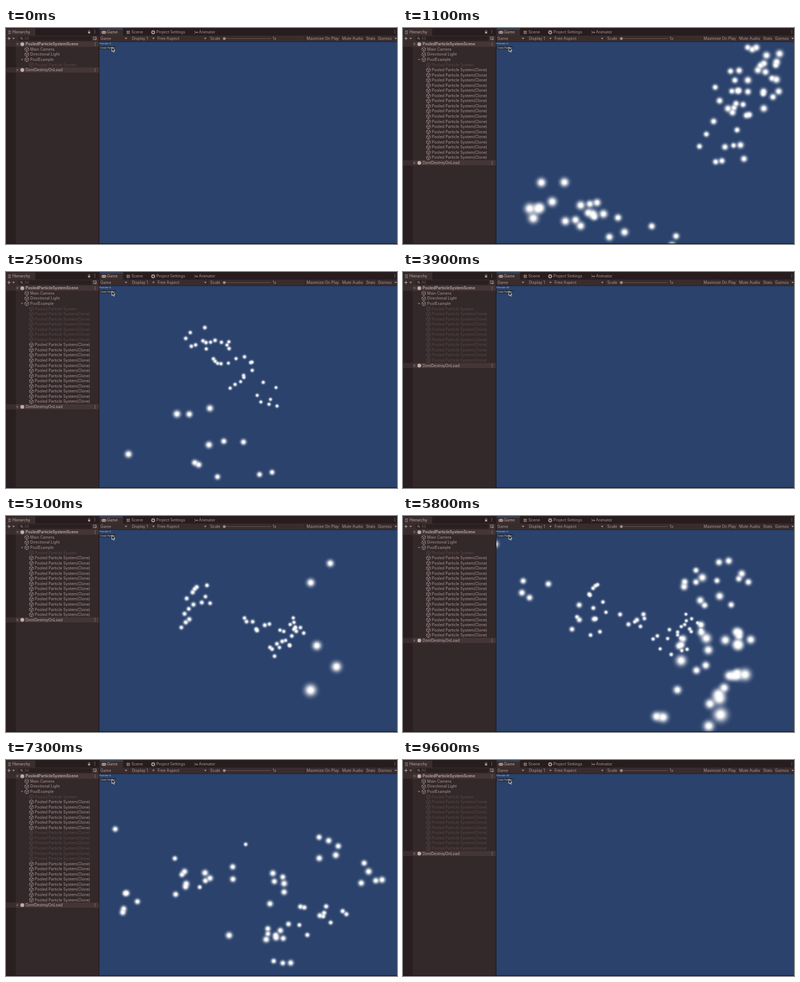
An HTML page with a canvas that plays this animation: 720 px wide and 400 px high, repeating every 9.7 s.

```html
<!DOCTYPE html>
<html lang="en">
<head>
<meta charset="utf-8">
<title>Particle pool</title>
<style>
html, body { margin: 0; width: 100%; height: 100%; overflow: hidden; background: #1c1516; }
canvas { display: block; }
</style>
</head>
<body>
<canvas id="stage" width="720" height="400"></canvas>
<script>
const ctx = document.getElementById('stage').getContext('2d');
const LOOP = 9700, STEP = 100, ROW = 9.55;
const POOL_MAX = 10, LIFE = 2100, EMITTED = 10, SPEED = 5, CONE = 25 * Math.PI / 180;
const VIEW = { x: 172, y: 26, w: 548, h: 373, cx: 446, cy: 213, focal: 324 };
const TEXT = '#ae9897', BRIGHT = '#c1adac', DIM = '#5b4a49', FAINT = '#857271';
const PANEL = '#33282a', BAR = '#271d1e', TAB = '#3b2e2f', TOOLBAR = '#392c2d', EDGE = '#1c1516';

// Each click starts some systems, scattered between two points (screen x, y and depth)
const clicks = [
  { at: 300, count: 6, a: [690, 40, 11], b: [620, 210, 13] },
  { at: 700, count: 6, a: [200, 300, 8], b: [470, 380, 12] },
  { at: 1100, count: 6, a: [345, 95, 19], b: [510, 255, 22] },
  { at: 4450, count: 6, a: [335, 150, 18], b: [560, 250, 22] },
  { at: 5000, count: 6, a: [590, 80, 12], b: [610, 390, 6] },
  { at: 5400, count: 4, a: [160, 70, 11], b: [390, 215, 18] },
  { at: 5900, count: 4, a: [430, 350, 11], b: [620, 340, 16] },
  { at: 6800, count: 6, a: [240, 260, 14], b: [690, 175, 13] }
];
const events = clicks
  .flatMap(click => [{ time: click.at, click, take: true }, { time: click.at + LIFE, click }])
  .sort((p, q) => p.time - q.time);

const random = seed => {
  const v = Math.sin(seed * 127.1 + 11.7) * 43758.5453;
  return v - Math.floor(v);
};

const glow = document.createElement('canvas');
glow.width = glow.height = 128;
{
  const g = glow.getContext('2d'), fade = g.createRadialGradient(64, 64, 0, 64, 64, 64);
  for (let r = 0; r <= 1; r += .1) {
    const alpha = Math.min(1, 1.15 * Math.exp(-4.5 * r * r)) * (1 - r ** 4);
    fade.addColorStop(r, `rgba(255,255,255,${Math.max(0, alpha).toFixed(3)})`);
  }
  fade.addColorStop(1, 'rgba(255,255,255,0)');
  g.fillStyle = fade;
  g.fillRect(0, 0, 128, 128);
}

function rect(x, y, w, h, fill) {
  ctx.fillStyle = fill;
  ctx.fillRect(x, y, w, h);
}

function pill(x, y, w, h, r, fill) {
  ctx.beginPath();
  ctx.roundRect(x, y, w, h, r);
  ctx.fillStyle = fill;
  ctx.fill();
}

function text(str, x, y, fill = TEXT, size = 7.1, weight = 400, family = 'Inter') {
  ctx.font = `${weight} ${size}px ${family}, sans-serif`;
  ctx.fillStyle = fill;
  ctx.fillText(str, x, y);
}

function poly(points, color, filled) {
  ctx.beginPath();
  points.forEach(([x, y]) => ctx.lineTo(x, y));
  ctx.strokeStyle = ctx.fillStyle = color;
  filled ? ctx.fill() : ctx.stroke();
}

function circle(x, y, r, color, filled = true) {
  ctx.beginPath();
  ctx.arc(x, y, r, 0, 7);
  ctx.strokeStyle = ctx.fillStyle = color;
  filled ? ctx.fill() : ctx.stroke();
}

const down = (x, y, color = TEXT) => poly([[x - 2.3, y - 1.2], [x + 2.3, y - 1.2], [x, y + 1.5]], color, true);
const kebab = (x, y) => [-2.6, 0, 2.6].forEach(d => circle(x, y + d, .7, TEXT));

function cube(x, y, color) {
  const corner = i => [x + 4 * Math.sin(i * Math.PI / 3), y - 4 * Math.cos(i * Math.PI / 3)];
  ctx.lineWidth = .8;
  poly([0, 1, 2, 3, 4, 5, 6].map(corner), color);
  [1, 3, 5].forEach(i => poly([[x, y], corner(i)], color));
}

function item(name, indent, row, color = TEXT) {
  const y = 30 + ROW * row;
  cube(indent, y, color);
  text(name, indent + 6.3, y + .2, color);
}

function sceneRow(name, row, weight) {
  const y = 30 + ROW * row;
  rect(0, y - 4.8, 18, ROW, '#392d2e');
  rect(18, y - 4.8, 153, ROW, '#443637');
  circle(30, y, 3.5, BRIGHT);
  text(name, 36, y + .2, BRIGHT, 7.1, weight);
  kebab(164, y);
}

// Replays every take and return up to t; systems beyond the pool's limit are destroyed
function poolAt(t) {
  const rows = [], idle = [], held = new Map();
  for (const { time, click, take } of events) {
    if (time > t) break;
    if (take) {
      held.set(click, Array.from({ length: click.count }, () => {
        const row = idle.shift() || rows[rows.push({}) - 1];
        row.active = true;
        return row;
      }));
    } else {
      for (const row of held.get(click)) {
        row.active = false;
        if (idle.length < POOL_MAX) idle.push(row);
        else rows.splice(rows.indexOf(row), 1);
      }
    }
  }
  return { rows, idle: idle.length };
}

function drawHierarchy(rows) {
  rect(0, 0, 171, 400, PANEL);
  rect(0, 0, 171, 14, BAR);
  rect(1, 1, 53, 13, TAB);
  rect(0, 14, 171, 11.3, TOOLBAR);
  rect(0, 25, 18, 374, '#291f20');
  [5, 7.5, 10].forEach(y => rect(4, y, 5, .9, TEXT));
  text('Hierarchy', 12, 7.9, BRIGHT);
  rect(151, 7, 4, 3.2, TEXT);
  ctx.lineWidth = .8;
  circle(153, 6.2, 1.6, TEXT, false);
  kebab(163.5, 7);
  rect(2.5, 18.9, 6, 1, BRIGHT);
  rect(5, 16.4, 1, 6, BRIGHT);
  down(14, 19.4);
  pill(23, 15.3, 135, 8.3, 3, '#2a2021');
  circle(28.4, 18.8, 1.7, TEXT, false);
  poly([[29.6, 20], [31.2, 21.8]], TEXT);
  text('All', 34, 19.6, '#6a5857');
  ctx.strokeRect(161, 16.5, 5, 5);
  circle(165, 20.5, 1.7, TEXT, false);

  sceneRow('PooledParticleSystemScene', 0, 600);
  down(21, 30, FAINT);
  item('Main Camera', 38.3, 1);
  item('Directional Light', 38.3, 2);
  item('PoolExample', 38.3, 3);
  down(29.5, 30 + ROW * 3, FAINT);
  item('Pooled Particle System', 46.7, 4, DIM);
  rows.forEach((row, i) => item('Pooled Particle System(Clone)', 46.7, 5 + i, row.active ? TEXT : DIM));
  const last = 5 + rows.length, y = 30 + ROW * last;
  sceneRow('DontDestroyOnLoad', last, 400);
  poly([[19.8, y - 2.3], [22.6, y], [19.8, y + 2.3]], FAINT, true);
}

function drawToolbar() {
  rect(171, 0, 549, 14, BAR);
  rect(172.5, 1, 43, 13, TAB);
  rect(172.5, 1, 43, 1, '#3c6288');
  rect(172, 14, 548, 11.5, TOOLBAR);
  pill(176, 5.4, 8.5, 5, 2.5, BRIGHT);
  [178.4, 182.1].forEach(x => circle(x, 7.9, 1, TAB));
  ctx.lineWidth = .9;
  [-1.4, 1.4].forEach(d => {
    poly([[221.5, 8 + d], [228.5, 8 + d]], TEXT);
    poly([[225 + d, 4.5], [225 + d, 11.5]], TEXT);
  });
  ctx.lineWidth = 1.6;
  circle(271, 8, 2.4, TEXT, false);
  for (let a = 0; a < 6.2; a += Math.PI / 4)
    circle(271 + 3.4 * Math.cos(a), 8 + 3.4 * Math.sin(a), .75, TEXT);
  ctx.lineWidth = .9;
  poly([[347, 5.4], [349.3, 8], [352.5, 8]], TEXT);
  poly([[347, 10.6], [349.3, 8]], TEXT);
  poly([[351.3, 6.2], [353.6, 8], [351.3, 9.8]], TEXT, true);
  text('Game', 186, 7.9, BRIGHT);
  text('Scene', 231, 7.9);
  text('Project Settings', 277, 7.9);
  text('Animator', 355.3, 7.9);
  kebab(716, 7);

  [['Game', 174], ['Display 1', 232], ['Free Aspect', 279], ['Scale', 376], ['1x', 491],
   ['Maximize On Play', 553.5], ['Mute Audio', 619], ['Stats', 663], ['Gizmos', 685]]
    .forEach(([label, x]) => text(label, x, 19.6));
  [221, 271.5, 367, 717.5].forEach(x => down(x, 19.5));
  [227, 276, 371, 550, 616, 660, 682].forEach(x => rect(x, 14.5, .6, 10.5, BAR));
  rect(402, 19.2, 86, .9, '#6a5a59');
  circle(402, 19.6, 2.7, '#9c8a89');
}

// Ten particles, a tenth of a second apart, leave in a cone pointing away from the camera
function drawSystem(x, y, depth, started, t, seed) {
  for (let k = 0; k < EMITTED; k++) {
    const age = (t - started - 50 - k * 100) / 1000;
    if (age < 0 || age >= 1) continue;
    const radius = Math.sqrt(random(seed + k)), turn = random(seed + k + .37) * Math.PI * 2;
    const spread = radius + SPEED * age * Math.sin(CONE * radius);
    const z = depth + SPEED * age * Math.cos(CONE * radius);
    const zoom = VIEW.focal / z;
    const px = VIEW.cx + (x - VIEW.cx) * depth / z + zoom * spread * Math.cos(turn);
    const py = VIEW.cy + (y - VIEW.cy) * depth / z + zoom * spread * Math.sin(turn);
    ctx.drawImage(glow, px - zoom / 2, py - zoom / 2, zoom, zoom);
  }
}

function drawParticles(t) {
  clicks.forEach(({ at, count, a, b }, c) => {
    for (let i = 0; i < count; i++) {
      const seed = c * 211 + i * 23 + 1;
      const [x, y, depth] = a.map((from, axis) => from + (b[axis] - from) * i / (count - 1));
      const jitter = n => (random(seed + n) - .5) * 80;
      drawSystem(x + jitter(.61), y + jitter(.83), depth, at, t, seed);
    }
  });
}

function drawGame(t, idle) {
  ctx.save();
  ctx.beginPath();
  ctx.rect(VIEW.x, VIEW.y, VIEW.w, VIEW.h);
  ctx.clip();
  rect(VIEW.x, VIEW.y, VIEW.w, VIEW.h, '#2a426c');
  drawParticles(t);
  text('Pool size: ' + idle, 172.3, 29, '#d5dbe6', 4, 400, 'Liberation Sans');
  rect(172.6, 33.4, 29.4, 6.2, '#27303f');
  text('Create Particles', 174, 36.6, '#e4e6ea', 3.8, 400, 'Liberation Sans');
  ctx.restore();
  const cursor = [[0, 0], [0, 8.2], [1.9, 6.5], [3.2, 9.4], [4.6, 8.8], [3.3, 6], [5.8, 5.8], [0, 0]]
    .map(([x, y]) => [x + 195, y + 35.5]);
  ctx.lineWidth = .9;
  poly(cursor, '#111', true);
  poly(cursor, '#f2f2f2');
}

function frame(now) {
  const t = Math.floor(now % LOOP / STEP) * STEP;
  const { rows, idle } = poolAt(t);
  ctx.textBaseline = 'middle';
  rect(0, 0, 720, 400, EDGE);
  drawHierarchy(rows);
  drawToolbar();
  drawGame(t, idle);
  rect(0, 398.8, 720, 1.2, EDGE);
  requestAnimationFrame(frame);
}
requestAnimationFrame(frame);
</script>
</body>
</html>
```
